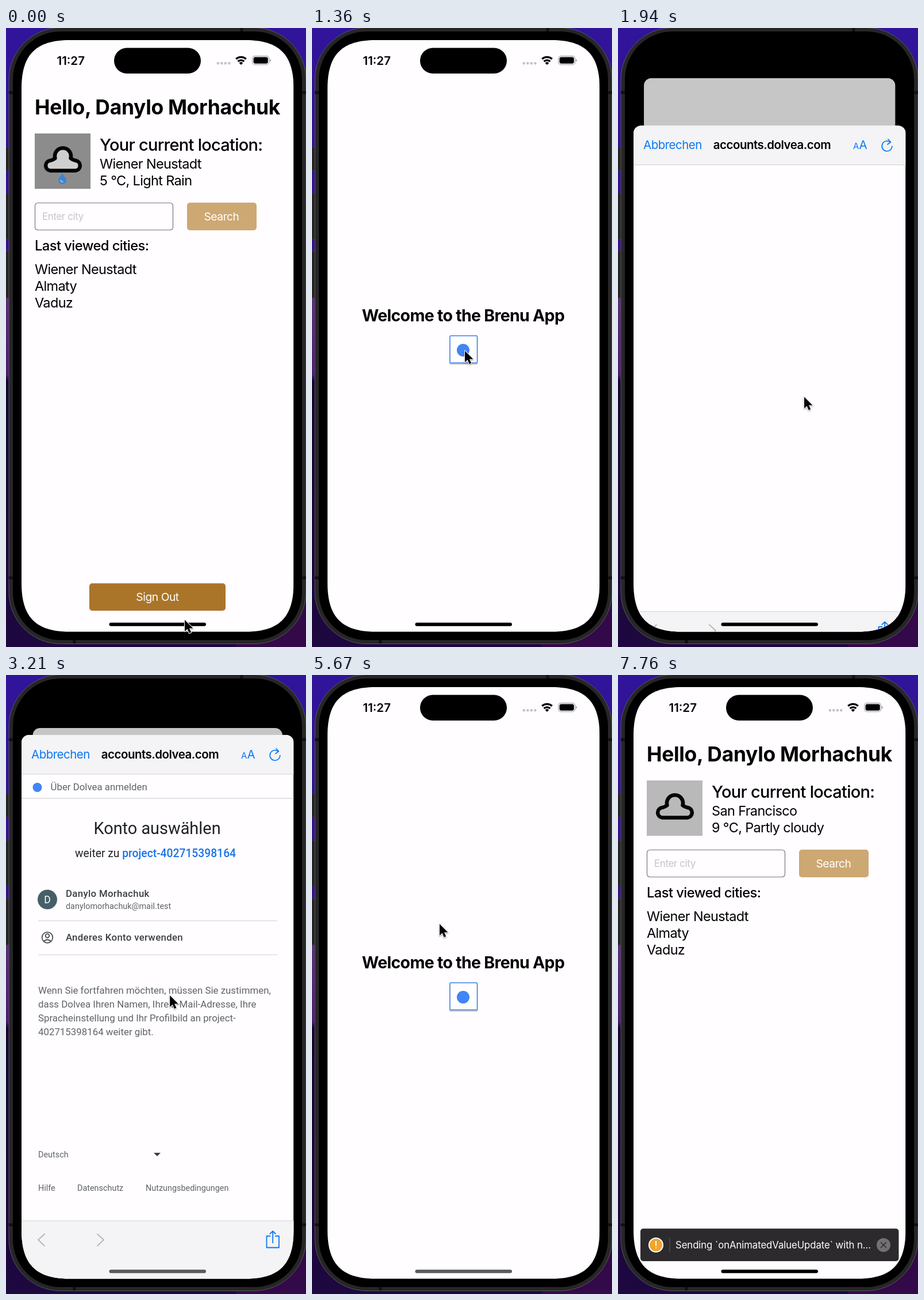
Write an HTML page that moves like this. It is 522 px wide and 1074 px high and loops after 7790 ms.

```html
<!DOCTYPE html>
<html lang="de">
<head>
<meta charset="utf-8">
<title>Sign-in demo</title>
<style>
html, body { margin: 0; width: 100%; height: 100%; overflow: hidden; background: #16062e; }
svg { display: block; width: 100vw; height: 100vh; }
text { font-family: Inter, "Liberation Sans", sans-serif; letter-spacing: -.025em; }
.b { font-weight: 700; }
.s { font-weight: 600; font-size: 20.5px; }
.m { font-weight: 500; }
.t { font-size: 23.5px; letter-spacing: -.028em; }
.btn { font-size: 19.3px; fill: #fff; text-anchor: middle; }
.mid { text-anchor: middle; }
.note { font-size: 15.6px; letter-spacing: -.01em; text-anchor: middle; }
.link { font-size: 20.5px; fill: #0a78f5; }
#page text { font-family: Roboto, "Liberation Sans", sans-serif; letter-spacing: 0; fill: #5f6368; font-size: 16.85px; }
#page .big { font-size: 28.9px; fill: #202124; }
#page .sub { font-size: 19.3px; fill: #202124; }
#page .row { font-weight: 500; letter-spacing: .3px; fill: #3c4043; }
#page .small { font-size: 14.4px; }
.line { fill: none; stroke-linecap: round; stroke-linejoin: round; }
</style>
</head>
<body>
<svg viewBox="0 0 522 1074" preserveAspectRatio="none">
<defs>
  <linearGradient id="wall" x2="0" y2="1">
    <stop offset="0" stop-color="#30149a"/><stop offset=".35" stop-color="#35108a"/>
    <stop offset=".44" stop-color="#5a2d7a"/><stop offset=".56" stop-color="#4d1c74"/>
    <stop offset=".57" stop-color="#16062e"/><stop offset="1" stop-color="#1d0840"/>
  </linearGradient>
  <clipPath id="screen">
    <path d="M27 105C27 46 52 21 111 21H416.500C475.500 21 500.500 46 500.500 105V963.500C500.500 1022.500 475.500 1047.500 416.500 1047.500H111C52 1047.500 27 1022.500 27 963.500z"/>
  </clipPath>
  <clipPath id="cardClip"><rect x="27" y="21" width="473.5" height="1027" rx="14"/></clipPath>
  <path id="cloud" d="M77 247.500H121a8.800 8.800 0 0 0 0-17.500q-5-1-8.500-4a14 14 0 1 0-27 0q-3.500 3-8.500 4a8.800 8.800 0 0 0 0 17.500z" stroke="#050505" stroke-width="6.600" stroke-linejoin="round"/>
</defs>

<!-- wallpaper and phone body -->
<rect width="522" height="1074" fill="url(#wall)"/>
<rect x="400" y="960" width="122" height="114" fill="#330949"/>
<g fill="#242424" stroke="#353437">
  <rect x="-4" y="207" width="10" height="40"/>
  <rect x="-4" y="287" width="10" height="79"/>
  <rect x="-4" y="388" width="10" height="80"/>
</g>
<rect x="5" y="-.5" width="517" height="1069" rx="90" fill="#262627" stroke="#575658"/>
<path d="M5 112h7M515 112h7M5 954h7M515 954h7M410 0v6M119 1062v6" stroke="#111" stroke-width="5"/>
<rect x="12" y="6" width="503" height="1056" rx="83"/>

<g clip-path="url(#screen)">
  <rect x="27" y="21" width="474" height="1027"/>

  <g id="card"><g clip-path="url(#cardClip)">
    <rect x="27" y="21" width="474" height="1027" fill="#fffdff"/>

    <g id="home">
      <text class="b" x="50" y="150" style="font-size:35.5px;letter-spacing:-.01em">Hello, Danylo Morhachuk</text>
      <text class="m" x="163" y="213" font-size="29">Your current location:</text>
      <g id="rain">
        <rect x="50" y="183" width="97" height="96" fill="#8d8c8d"/>
        <use href="#cloud" fill="#d0cfd0"/>
        <path d="M98 252c2 5 7 8 7 12.500a7 6.500 0 0 1-14 0c0-4.500 5-7.500 7-12.500z" fill="#3f83cf"/>
        <path d="M95 264a4 4 0 0 0 4 3" class="line" stroke="#8cc0ee" stroke-width="2"/>
        <text class="t" x="163" y="244">Wiener Neustadt</text>
        <text class="t" x="163" y="273">5 °C, Light Rain</text>
      </g>
      <g id="cloudy">
        <rect x="50" y="183" width="97" height="96" fill="#bab9ba"/>
        <use href="#cloud" fill="#bab9ba"/>
        <text class="t" x="163" y="244">San Francisco</text>
        <text class="t" x="163" y="273">9 °C, Partly cloudy</text>
      </g>
      <rect x="50.500" y="303.500" width="240" height="47" rx="5" fill="none" stroke="#78777a" stroke-width="1.200"/>
      <text x="63" y="333" font-size="17" fill="#c5c4c8">Enter city</text>
      <rect x="315" y="303" width="121" height="48" rx="5" fill="#cda873"/>
      <text class="btn" x="375" y="333.500">Search</text>
      <text class="m" x="50" y="386" font-size="23.8">Last viewed cities:</text>
      <text class="t" x="50" y="427">Wiener Neustadt</text>
      <text class="t" x="50" y="456">Almaty</text>
      <text class="t" x="50" y="485">Vaduz</text>
      <g id="signOut">
        <rect x="145" y="963.500" width="237" height="47.500" rx="5" fill="#aa7529"/>
        <text class="btn" x="263.500" y="994">Sign Out</text>
      </g>
      <g id="toast">
        <rect x="39" y="960.500" width="449.500" height="56.500" rx="5" fill="#2c2a2d"/>
        <circle cx="66" cy="989" r="12" fill="#f0a52f" stroke="#fff" stroke-width="2"/>
        <path d="M66 983v7M66 994v.1" class="line" stroke="#fff" stroke-width="2"/>
        <path d="M90 976v26" stroke="#5a585b"/>
        <text x="100" y="995" fill="#fff" style="font-size:16.8px;letter-spacing:-.006em">Sending `onAnimatedValueUpdate` with n...</text>
        <circle cx="462" cy="989" r="12" fill="#717072"/>
        <path d="M457.500 984.500l9 9m0-9l-9 9" class="line" stroke="#2c2a2d" stroke-width="1.500"/>
      </g>
    </g>

    <g id="welcome">
      <text class="b mid" x="263" y="509" font-size="28.5">Welcome to the Brenu App</text>
      <rect x="239" y="535" width="49.500" height="49" rx="2" opacity=".22"/>
      <rect x="240" y="534" width="47.500" height="47" rx="1.500" fill="#fff" stroke="#3f7fe8" stroke-width="1.500"/>
      <circle cx="263" cy="559" r="11" fill="#4285f4"/>
    </g>
  </g></g>

  <g id="status">
    <text class="s" x="88.500" y="63.500" style="letter-spacing:0">11:27</text>
    <rect x="188" y="34.500" width="151" height="44.500" rx="22.200"/>
    <path d="M368.800 61.300h.1m6.400 0h.1m6.400 0h.1m6.400 0h.1" class="line" stroke="#c4c3c6" stroke-width="4.600"/>
    <g transform="translate(409 64)">
      <path d="M-8.800-10.200a13 13 0 0 1 17.600 0M-5.400-6a8 8 0 0 1 10.800 0" fill="none" stroke="#000" stroke-width="3.200"/>
      <path d="M0 0l-3.400-3.400a5 5 0 0 1 6.800 0z"/>
    </g>
    <rect x="428.700" y="48.700" width="29" height="15" rx="4.500" fill="none" stroke="#a5a4a7" stroke-width="1.200"/>
    <rect x="430.600" y="50.600" width="25.200" height="11.200" rx="3"/>
    <path d="M459 53.700q2 .8 2 2.500t-2 2.500z" fill="#a5a4a7"/>
  </g>

  <rect id="dim" x="27" y="21" width="474" height="1027"/>

  <g id="alert">
    <rect x="101" y="429" width="325.500" height="241" rx="17" fill="#e7e6e8" fill-opacity=".97"/>
    <g class="mid">
      <text class="s" x="264" y="472">„brenuapp“ möchte zum</text>
      <text class="s" x="264" y="498.500">Anmelden „dolvea.com“</text>
      <text class="s" x="264" y="525">verwenden</text>
    </g>
    <text class="note" x="264" y="549">Hiermit erlaubst du der App und der</text>
    <text class="note" x="264" y="568">Website, Informationen zu deiner</text>
    <text class="note" x="264" y="587">Person zu teilen.</text>
    <path d="M101 616.500h325.500M264 616.500v53.500" stroke="#c3c2c5"/>
    <text class="link mid" x="182.500" y="651">Abbrechen</text>
    <text class="link mid" x="345" y="651">Fortfahren</text>
  </g>

  <g id="sheet">
    <path d="M27 1060V117a13 13 0 0 1 13-13H487.500a13 13 0 0 1 13 13V1060z" fill="#fffdff"/>
    <path d="M27 172V117a13 13 0 0 1 13-13H487.500a13 13 0 0 1 13 13V172z" fill="#f4f3f5"/>
    <path d="M27 172h474" stroke="#d3d2d5"/>
    <text class="link" x="44" y="145">Abbrechen</text>
    <text class="s mid" x="268" y="145">accounts.dolvea.com</text>
    <text class="link" x="409" y="145" style="font-size:15px">A</text>
    <text class="link" x="419.500" y="145">A</text>
    <path id="reload" d="M6-6.500A8.800 8.800 0 1 0 8.800 0M2-12l4.500 5-5.500 4" class="line" stroke="#0a78f5" stroke-width="1.700"/>

    <g id="page">
      <circle cx="54.500" cy="195" r="8" fill="#4285f4"/>
      <text x="77.500" y="200">Über Dolvea anmelden</text>
      <path d="M27 214h474" stroke="#c6c8cc"/>
      <text class="big mid" x="263" y="276">Konto auswählen</text>
      <text class="sub" x="120" y="316">weiter zu <tspan font-weight="500" fill="#1a73e8">project-402715398164</tspan></text>
      <circle cx="72" cy="389.500" r="17" fill="#465f69"/>
      <text class="mid" x="72" y="396" style="font-size:17.500px;fill:#fff">D</text>
      <text class="row" x="104" y="385">Danylo Morhachuk</text>
      <text class="small" x="104" y="406">danylomorhachuk@mail.test</text>
      <path d="M56 426.500h416M56 485.500h416" stroke="#cfd1d5"/>
      <g fill="none" stroke="#4a4d52" stroke-width="1.800">
        <circle cx="72" cy="455.500" r="9.300"/><circle cx="72" cy="452.500" r="3.300"/>
        <path d="M65.500 462q6.500-5.500 13 0"/>
      </g>
      <text class="row" x="104" y="461">Anderes Konto verwenden</text>
      <text x="56" y="553">Wenn Sie fortfahren möchten, müssen Sie zustimmen,</text>
      <text x="56" y="577">dass Dolvea Ihren Namen, Ihre E-Mail-Adresse, Ihre</text>
      <text x="56" y="601">Spracheinstellung und Ihr Profilbild an project-</text>
      <text x="56" y="625">402715398164 weiter gibt.</text>
      <text class="small" x="56" y="837">Deutsch</text>
      <path d="M257 829h12l-6 6z" fill="#3c4043"/>
      <text class="small" x="56" y="894.500">Hilfe</text>
      <text class="small" x="124" y="894.500">Datenschutz</text>
      <text class="small" x="243" y="894.500">Nutzungsbedingungen</text>
    </g>
    <g id="loading">
      <rect x="27" y="171.500" width="474" height="4.500" fill="#d9d8da"/>
      <rect id="bar" y="171.500" width="296" height="4.500" fill="#1a6fe6"/>
      <rect x="27" y="169" width="9" height="2.500" fill="#8fc0f8"/>
    </g>

    <rect x="27" y="947" width="474" height="110" fill="#f4f3f5"/>
    <path d="M27 947h474" stroke="#d3d2d5"/>
    <g class="line" stroke-width="1.800">
      <path d="M67 970l-11 10 11 10.500M159 970l11 10-11 10.500" stroke="#b5b4b8"/>
      <path d="M459.500 973.500h-6v20h21.500v-20h-6M464.200 985v-20M459.500 969.500l4.700-4.700 4.700 4.700" stroke="#0a78f5"/>
    </g>
  </g>

  <rect id="bottomBar" x="179.500" y="1031.700" width="168.500" height="6" rx="3"/>
</g>

<path id="cursor" d="M0 0V20l4.600-4.200 3.200 7.300 3.400-1.500-3.200-7H14.500z" stroke="#fff" stroke-width="2" stroke-linejoin="round" paint-order="stroke" style="filter:drop-shadow(0 1px 1px #0006)"/>
</svg>

<script>
const LOOP = 7790;
const el = Object.fromEntries([...document.querySelectorAll('svg [id]')].map(e => [e.id, e]));

// [time, x, y] stops of the pointer
const path = [
  [0, 311, 1027], [260, 290, 985], [500, 289, 984], [940, 278, 643], [1150, 266, 560],
  [1480, 266, 560], [1790, 324, 640], [2850, 324, 640], [3800, 204, 380],
  [4900, 204, 380], [5500, 222, 432], [5790, 222, 432], [6330, 535, 470]
];

const clamp = v => Math.max(0, Math.min(1, v));
const ramp = (t, a, b) => clamp((t - a) / (b - a));
const smooth = u => u * u * (3 - 2 * u);
const easeOut = u => 1 - (1 - u) ** 3;
const within = (t, a, b) => t >= a && t < b;
const show = (e, on) => e.setAttribute('display', on ? 'inline' : 'none');
const fade = (e, v) => { show(e, v > 0); e.setAttribute('opacity', v); };
const place = (e, v) => e.setAttribute('transform', v);

function pointer(t) {
  const i = path.findIndex(p => p[0] > t);
  if (i < 0) return path.at(-1).slice(1);
  const [a, b] = [path[i - 1], path[i]];
  const u = smooth(ramp(t, a[0], b[0]));
  return [1, 2].map(k => a[k] + (b[k] - a[k]) * u);
}

function draw(t) {
  const atWelcome = within(t, 560, 6450);
  show(el.home, !atWelcome);
  show(el.welcome, atWelcome);
  show(el.rain, t < 560);
  show(el.cloudy, t > 6720);
  el.signOut.setAttribute('opacity', within(t, 380, 500) ? .4 : 1);
  const toast = easeOut(ramp(t, 6900, 7000));
  fade(el.toast, toast);
  place(el.toast, `translate(0 ${(1 - toast) * 90})`);

  const asked = smooth(ramp(t, 1500, 1590)), answered = ramp(t, 1860, 1942);
  fade(el.alert, asked * (1 - answered));
  place(el.alert, `translate(264 550) scale(${1.15 - .15 * asked}) translate(-264 -550)`);

  const p = easeOut(ramp(t, 1871.5, 1989.5)) * (1 - smooth(ramp(t, 5440, 5610)));
  show(el.sheet, p > 0);
  place(el.sheet, `translate(0 ${(1 - p) * 943})`);
  place(el.card, `translate(263.5 ${21 + 71 * p}) scale(${1 - .082 * p}) translate(-263.5 -21)`);
  fade(el.status, clamp(1 - 2 * p));
  fade(el.dim, .22 * (t < 3000 ? asked : p));

  const busy = t >= 3960;
  fade(el.page, t < 2480 ? 0 : 1 - .45 * ramp(t, 3960, 4020));
  show(el.loading, busy);
  el.bar.setAttribute('x', -269 + 769 * (((t - 4180) / 480 + 10.459) % 1));
  place(el.reload, `translate(468 139.5) scale(${busy ? .65 : 1})`);

  const soft = within(t, 2480, 5900);
  el.bottomBar.setAttribute('fill', soft ? '#5a595b' : '#000');
  el.bottomBar.setAttribute('opacity', 1 - .94 * asked * (1 - ramp(t, 1870, 1930)));

  place(el.cursor, `translate(${pointer(t)})`);
}

function tick(now) {
  draw(now % LOOP);
  requestAnimationFrame(tick);
}
draw(0);
requestAnimationFrame(tick);
</script>
</body>
</html>
```
